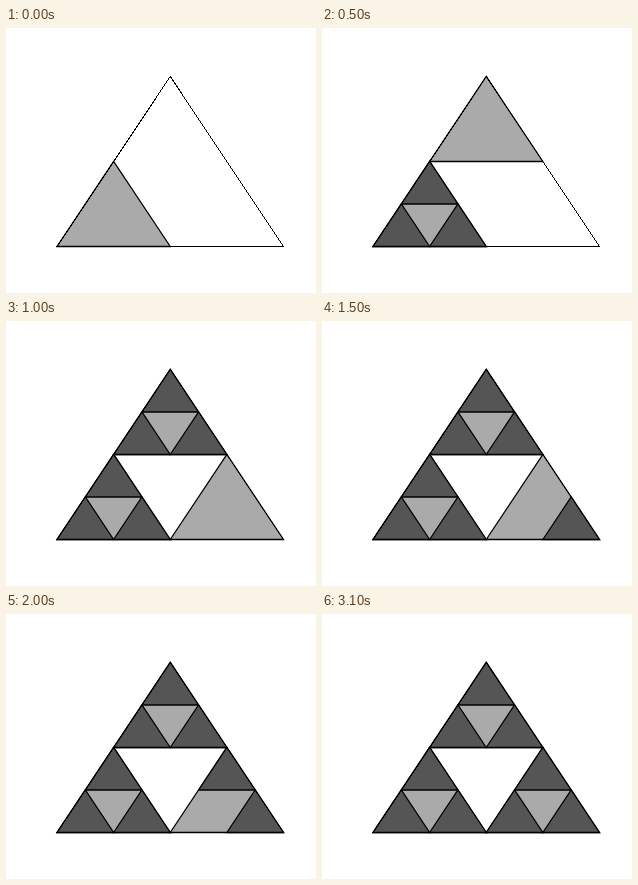
An HTML page for the animation above (3500 ms loop, 310x265 px).

```html
<!DOCTYPE html>
<html>
<head>
<meta charset="utf-8">
<style>
  html, body { margin: 0; height: 100%; overflow: hidden; background: #fff; }
  svg { display: block; }
  path { stroke: #000; stroke-width: 1.3; }
  .outline { fill: none; stroke-width: 1; shape-rendering: crispEdges; }
</style>
</head>
<body>
<svg width="310" height="265" viewBox="0 0 310 265"></svg>
<script>
const LIGHT = '#aaa', DARK = '#555';
const LEFT = 51, BASE = 218.5, WIDTH = 226.5, HEIGHT = 170;
const svg = document.querySelector('svg');

// Upright triangle; u, v and size are fractions of the whole, v measured upwards.
function triangle(u, v, size, fill, name = '') {
  const x = LEFT + u * WIDTH, y = BASE - v * HEIGHT;
  const w = size * WIDTH, h = size * HEIGHT;
  return `<path class="${name}" fill="${fill}" d="M${x} ${y}h${w}L${x + w / 2} ${y - h}z"/>`;
}

const half = (u, v) => triangle(u, v, .5, LIGHT);
const quarter = (u, v) => triangle(u, v, .25, DARK);
const corners = (u, v) =>
  quarter(u, v) + quarter(u + .25, v) + quarter(u + .125, v + .25);

// What each half second adds to the picture
const steps = [
  half(0, 0),
  corners(0, 0) + half(.25, .5),
  corners(.25, .5) + half(.5, 0),
  quarter(.75, 0),
  quarter(.625, .25),
  quarter(.5, 0)
];
const outline = triangle(0, 0, 1, 'none', 'outline');

let shown = -1;
function draw(now) {
  const step = Math.min(5, Math.floor((now - start) % 3500 / 500));
  if (step !== shown) {
    shown = step;
    svg.innerHTML = steps.slice(0, step + 1).join('') + outline;
  }
  requestAnimationFrame(() => draw(performance.now()));
}
const start = performance.now();
draw(start);
</script>
</body>
</html>
```
